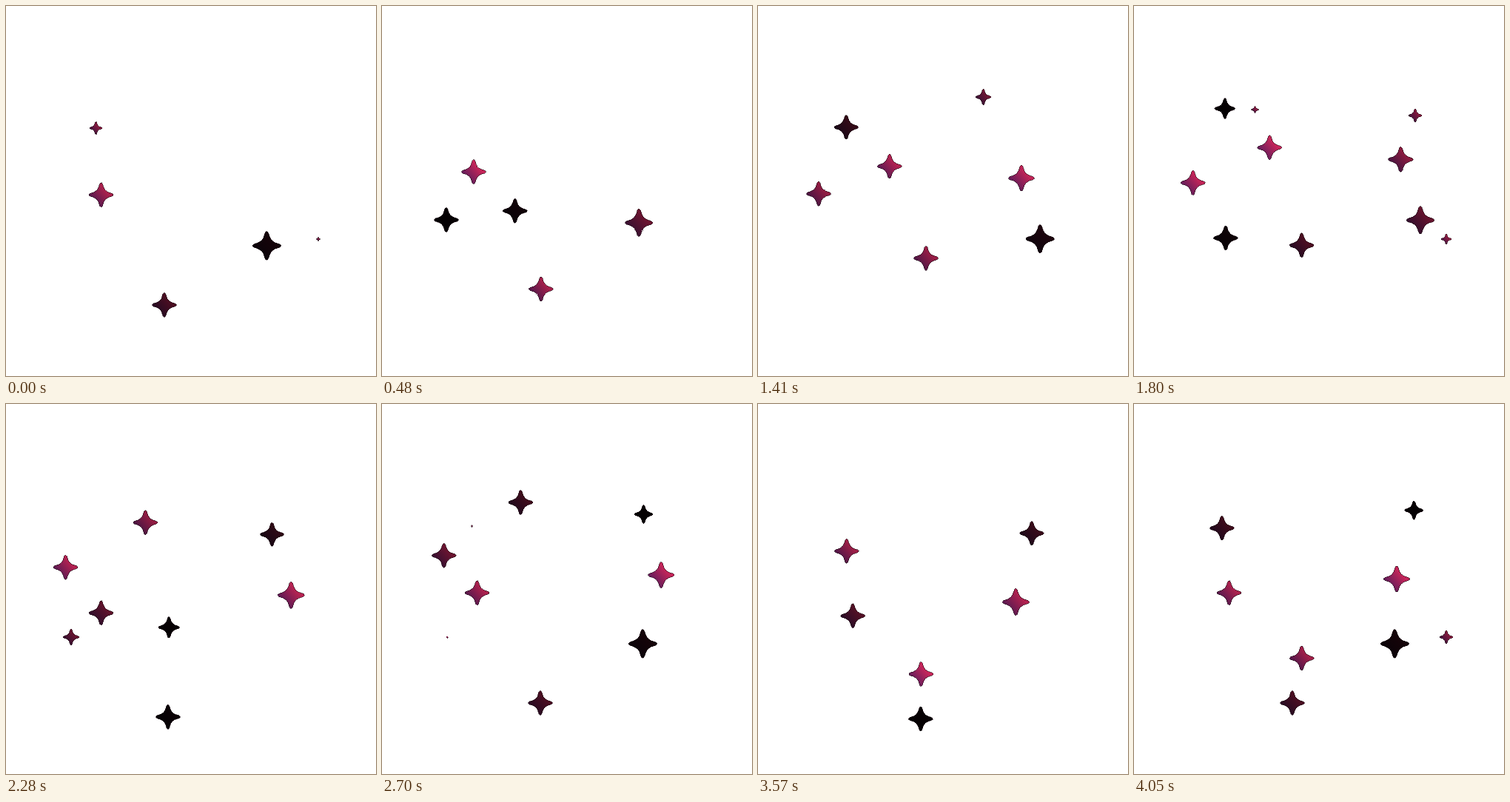
Animation, 500 px wide and 500 px high, one loop 4080 ms. Source, as an HTML page:

```html
<!DOCTYPE html>
<html lang="en">
<head>
<meta charset="utf-8">
<title>Drifting stars</title>
<style>
  html, body { margin: 0; width: 100%; height: 100%; overflow: hidden; background: #fff; }
  svg { display: block; width: 100vw; height: 100vh; }
</style>
</head>
<body>
<svg id="stage" viewBox="0 0 500 500"><defs id="defs"></defs></svg>
<script>
const LOOP = 4080, STEP = 30, BEAT = 1350;
const LIFE = 3010, SWAY_PERIOD = 2780, TWINKLE = 560;
const NS = "http://www.w3.org/2000/svg";
const PURPLE = [102, 30, 92], PINK = [200, 38, 90];
const RADIUS = 16.5;

// One arm, turned four times.
const ARM = [[-2, -14.6], [0, -18.4], [2, -14.6], [4, -6.5], [6.5, -4], [14.6, -2]];
const turn = ([x, y], n) => n ? turn([-y, x], n - 1) : [x, y];
const SHAPE = [0, 1, 2, 3].map(n => {
  const p = ARM.map(point => turn(point, n).join(" "));
  return `${n ? "L" : "M"}${p[0]}Q${p[1]} ${p[2]}C${p[3]} ${p[4]} ${p[5]}`;
}).join("") + "Z";

// Each path is timed from its beat: the star is born `lead` ms earlier, rises
// from y at `speed` px/s and sways about x, furthest right at `peak`.
const PATHS = [
  [{ lead: 1140, x: 123.8, sway: 5.3, peak: -210, y: 255.2, speed: 64.8 },
   { lead: 1140, x: 182, sway: 6.7, peak: 1060, y: 220.5, speed: 64.8 }],
  [{ lead: 300, x: 354, sway: 7, peak: 1980, y: 324, speed: 64.8, large: true },
   { lead: 300, x: 378.2, sway: 9.4, peak: 610, y: 318.6, speed: 64.8, large: true }],
  [{ lead: 620, x: 220.4, sway: 7.1, peak: 1570, y: 404, speed: 44.8 },
   { lead: 920, x: 83.2, sway: 3.7, peak: -790, y: 256, speed: 38 }]
];
const drifters = PATHS.flatMap(([main, other]) =>
  [main, other, main, main].map((path, n) => ({ path, beat: n * BEAT })));

// Fixed spots and the moments a twinkle starts there.
const SPOTS = [
  { x: 121.5, y: 165, starts: [-340, 2640] },
  { x: 422, y: 315, starts: [-120, 1520, 2880, 3690] },
  { x: 88, y: 315, starts: [490, 1840, 2640] },
  { x: 321.5, y: 356.5, starts: [490] },
  { x: 213, y: 98, starts: [780] },
  { x: 188, y: 381, starts: [780] },
  { x: 304.5, y: 123, starts: [985] },
  { x: 380, y: 148, starts: [1440] },
  { x: 163.5, y: 140, starts: [1600] }
];
const twinkles = SPOTS.flatMap(({ x, y, starts }) => starts.map(start => ({ x, y, start })));

function drifterState({ path, beat }, time) {
  const t = time - beat, age = t + path.lead;
  if (age < 0 || age > LIFE) return null;
  const shrink = Math.max(0, age / LIFE - 0.8) * 5;
  const swell = Math.sin(Math.PI * Math.min(1, Math.max(0, (age - 100) / 2850)));
  return {
    x: path.x + path.sway * Math.cos(2 * Math.PI * (t - path.peak) / SWAY_PERIOD),
    y: path.y - path.speed * t / 1000,
    r: (path.large ? 19.8 - 1.35 * age / 1000 : RADIUS) * (1 - 0.2 * shrink * shrink),
    light: 0.03 + 0.97 * swell ** 1.7
  };
}

function twinkleState({ x, y, start }, time) {
  const k = (time - start) / TWINKLE;
  if (k < 0 || k > 1) return null;
  return { x, y, r: 14 * k, light: 0.75 * (1 - k ** 5) };
}

function add(parent, tag, attrs) {
  const el = document.createElementNS(NS, tag);
  for (const key in attrs) el.setAttribute(key, attrs[key]);
  return parent.appendChild(el);
}

const stage = document.getElementById("stage"), defs = document.getElementById("defs");

function makeStar(state, index) {
  const id = "shade" + index;
  const gradient = add(defs, "linearGradient", { id, x1: 0.15, y1: 0.8, x2: 0.8, y2: 0.25 });
  const stops = [0.1, 0.85].map(offset => add(gradient, "stop", { offset }));
  const shape = add(stage, "path", {
    d: SHAPE, fill: `url(#${id})`, stroke: "#12000a", "stroke-opacity": 0.7,
    "stroke-width": 0.8, "vector-effect": "non-scaling-stroke", "shape-rendering": "crispEdges"
  });
  return { state, stops, shape };
}

const stars = [
  ...drifters.map(d => time => drifterState(d, time)),
  ...twinkles.map(s => time => twinkleState(s, time))
].map(makeStar);

const shade = (color, light) => `rgb(${color.map(c => Math.round(c * light)).join(",")})`;

function draw(time) {
  for (const { state, stops, shape } of stars) {
    const s = state(time);
    shape.style.display = s ? "" : "none";
    if (!s) continue;
    shape.setAttribute("transform", `translate(${s.x} ${s.y}) scale(${s.r / RADIUS})`);
    [PURPLE, PINK].forEach((color, i) => stops[i].setAttribute("stop-color", shade(color, s.light)));
  }
}

const begin = performance.now();
function tick() {
  const time = (performance.now() - begin) % LOOP;
  draw(Math.floor(time / STEP) * STEP);
  requestAnimationFrame(tick);
}
tick();
</script>
</body>
</html>
```
